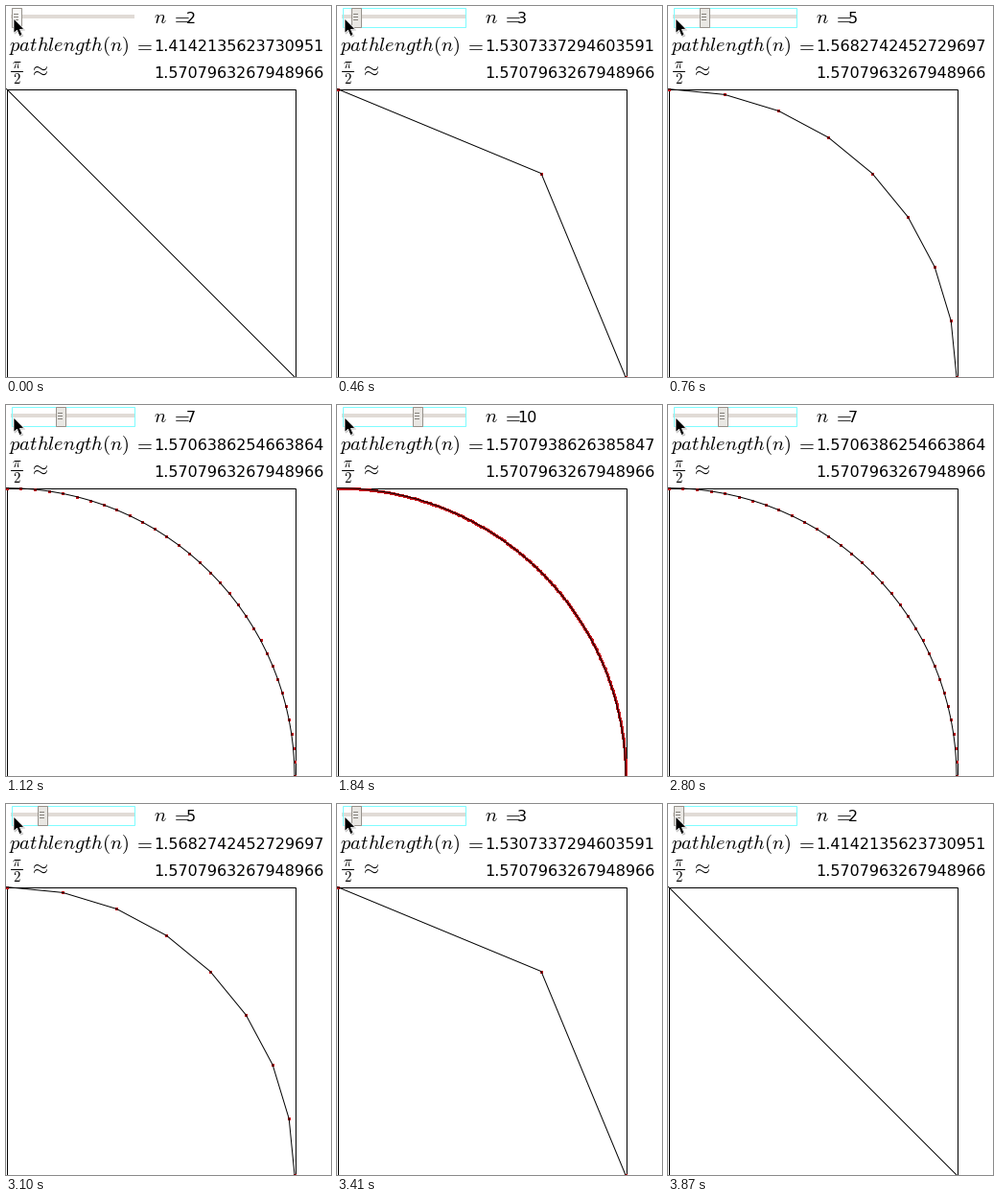
These frames come from a looping animation (339 px wide and 387 px high, 3900 ms). A matplotlib script:

```python
import numpy as np
import matplotlib as mpl
import matplotlib.pyplot as plt
from matplotlib.animation import FuncAnimation
from matplotlib.patches import Polygon, Rectangle

W, H, DPI = 339, 387, 64
PX = 72 / DPI          # points per pixel
STEP = 10              # ms per frame
LOOP = 3900

mpl.rcParams["mathtext.fontset"] = "cm"
mpl.rcParams["font.family"] = "DejaVu Sans"
mpl.rcParams["path.simplify"] = False

# The slider climbs from 2 to 11 and goes back down.
STARTS = [0, 460, 600, 760, 940, 1120, 1300, 1460, 1840, 2020,
          2300, 2460, 2620, 2800, 2960, 3100, 3280, 3410, 3870]
VALUES = list(range(2, 12)) + list(range(10, 1, -1))

LENGTHS = {
    2: "1.4142135623730951", 3: "1.5307337294603591",
    4: "1.5607225761290262", 5: "1.5682742452729697",
    6: "1.5701655784773767", 7: "1.5706386254663864",
    8: "1.5707569005721505", 9: "1.5707864701835453",
    10: "1.5707938626385847", 11: "1.5707957107555994",
}

fig = plt.figure(figsize=(W / DPI, H / DPI), dpi=DPI, facecolor="white")
ax = fig.add_axes([0, 0, 1, 1])
ax.set_xlim(0, W)
ax.set_ylim(H, 0)
ax.axis("off")


def box(x, y, w, h, z, fill="none", edge="none"):
    return ax.add_patch(Rectangle((x, y), w, h, facecolor=fill, edgecolor=edge,
                                  lw=PX, zorder=z))


def label(x, y, s, size=16):
    return ax.text(x, y, s, fontsize=size * PX, color="black",
                   ha="left", va="baseline")


def arc(n):
    a = np.linspace(0, np.pi / 2, 2 ** (n - 2) + 1)
    return 0.5 + 300.5 * np.sin(a), 387 - 300.4 * np.cos(a)


# Slider
track = box(5, 9, 129, 4, 1, fill="#e0dbd6")
ring = box(5.5, 1.5, 128, 20, 2, edge="#7ffcff")
knob = box(5.5, 1.5, 10, 20, 3, fill="#e9e7e3", edge="#96928c")
grips = [box(0, y, 5, 1, 4, fill="#85817b") for y in (8, 11, 14)]

# Mouse pointer
arrow = np.array([(8, 13), (8, 28.5), (11.5, 25.3), (14, 31.5),
                  (17, 30.2), (14.5, 24.4), (19, 24.2)])
ax.add_patch(Polygon(arrow + 1.2, fc="black", ec="none", alpha=0.25, zorder=8))
ax.add_patch(Polygon(arrow, fc="black", ec="white", lw=0.8 * PX, zorder=9))

# Formulas
MATH = 20.4
label(154, 18, "$n$", MATH)
label(172, 18, "$=$", MATH)
label(3, 47, "$pathlength(n)$", MATH)
label(133, 47, "$=$", MATH)
label(6, 65, r"$\pi$", 15)
label(7, 81, "$2$", 14.6)
box(5, 68, 13, 1, 5, fill="black")
label(24, 73, r"$\approx$", MATH)
n_text = label(188, 18, "2")
length_text = label(154, 47, "")
label(154, 75, "1.5707963267948966")

# Plot
box(0.5, 86.5, 301, 320, 5, edge="black")
dots, = ax.plot([], [], ls="none", marker="s", ms=3 * PX, mew=0,
                color="#c8141a", zorder=6)
curve, = ax.plot([], [], color="black", lw=PX, zorder=7)


def update(i):
    t = i * STEP
    n = VALUES[np.searchsorted(STARTS, t, side="right") - 1]
    touched = t >= STARTS[1]

    x = 5.5 + round(9.15 * (n - 2))
    knob.set_x(x)
    knob.set_facecolor("#e9e7e3" if touched else "#fbfaf9")
    for g in grips:
        g.set_x(x + 2.5)
    ring.set_visible(touched)

    n_text.set_text(str(n))
    length_text.set_text(LENGTHS[n])

    if n == 2:
        curve.set_data([0.5, 301.5], [86.5, 387.5])
    else:
        curve.set_data(*arc(n))
        dots.set_data(*arc(n))
    dots.set_visible(n > 2)
    return knob, ring, n_text, length_text, curve, dots, *grips


anim = FuncAnimation(fig, update, frames=LOOP // STEP, interval=STEP,
                     init_func=lambda: update(0), repeat=True,
                     repeat_delay=0, blit=False)
plt.show()
```
